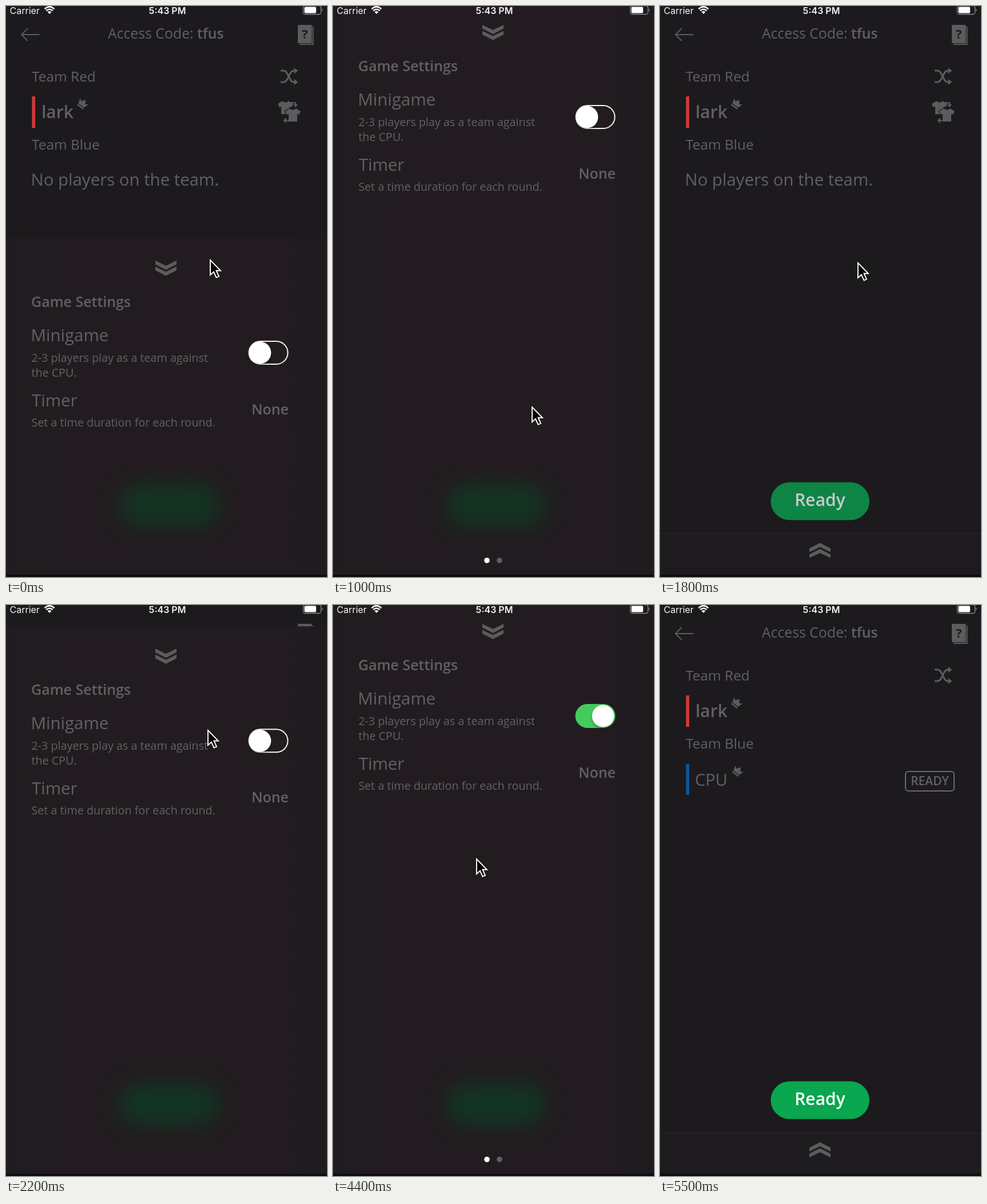
Write an HTML page that moves like this. It is 561 px wide and 998 px high and loops after 5600 ms.

```html
<!DOCTYPE html>
<html lang="en">
<head>
<meta charset="utf-8">
<title>Game lobby</title>
<style>
html, body { margin: 0; width: 100%; height: 100%; overflow: hidden; background: #1c1a1d; }
svg { display: block; width: 100vw; height: 100vh; }
text { font-family: 'Open Sans', 'Noto Sans', sans-serif; fill: #626063; white-space: pre; }
.bar text { font-family: Inter, Roboto, sans-serif; font-size: 16px; fill: #f4f4f4; }
.semi { font-weight: 600; }
.label { font-size: 24.4px; }
.big { font-size: 29.4px; }
.note { font-size: 19.7px; }
.head { font-size: 25px; font-weight: 600; }
.line { fill: none; stroke: #5c5b5d; }
.icon { fill: #5c5b5d; }
</style>
</head>
<body>
<svg viewBox="0 0 561 998" preserveAspectRatio="none">
  <defs>
    <linearGradient id="sheet">
      <stop offset="0" stop-color="#1f1b1f"/>
      <stop offset=".05" stop-color="#211c1f"/>
      <stop offset=".15" stop-color="#221c20"/>
      <stop offset=".87" stop-color="#221c20"/>
      <stop offset=".92" stop-color="#201b1f"/>
      <stop offset="1" stop-color="#1f1b1f"/>
    </linearGradient>
    <filter id="soft" x="-50%" y="-100%" width="200%" height="300%" color-interpolation-filters="sRGB">
      <feGaussianBlur stdDeviation="16"/>
    </filter>
    <filter id="shade" x="-40%" y="-40%" width="180%" height="180%">
      <feDropShadow dx="0" dy="3" stdDeviation="2.5" flood-opacity=".3"/>
    </filter>
    <clipPath id="cover"><rect id="coverBox" width="561" height="1100"/></clipPath>
    <path id="crown" d="M-9,-5 L-4.500,-1.500 L0,-8 L4.500,-1.500 L9,-5 L6.500,4 H-6.500 Z M-6.500,5.500 H6.500 V8 H-6.500 Z"/>
    <path id="shirt" d="M8,0 Q13.500,5 19,0 L27,5 L24,11 L21,9.500 V23 H6 V9.500 L3,11 L0,5 Z"/>
    <path id="chevron" d="M-18.500,-12.500 L0,-3.500 L18.500,-12.500 V-6 L0,3.500 L-18.500,-6 Z M-18.500,-2 L0,7 L18.500,-2 V4.500 L0,14 L-18.500,4.500 Z"/>
  </defs>

  <rect width="561" height="998" fill="#1c1a1d"/>

  <g id="lobby">
    <path class="line" stroke-width="1.8" d="M58.500,50 H27 M38,39 L27,50 L38,61"/>
    <text x="178" y="57" font-size="24.8">Access Code: <tspan class="semi">tfus</tspan></text>
    <path class="icon" d="M513,66 H535.500 V36 H537.500 V68 H513 Z M510,33 H534.500 V65 H510 Z"/>
    <text x="522.300" y="57" font-size="22" font-weight="700" text-anchor="middle" style="fill:#1c1a1d">?</text>

    <text class="label" x="45" y="132">Team Red</text>
    <path class="line" stroke-width="3" d="M480,113 H485 C494,113 494,133 503,133 H505 M480,133 H485 C494,133 494,113 503,113 H505"/>
    <path class="icon" d="M503.500,108 L510.500,113 L503.500,118.500 Z M503.500,127.500 L510.500,133 L503.500,138 Z"/>
    <rect x="45.500" y="158" width="5.500" height="55" fill="#d33a3b"/>
    <text class="semi" x="62" y="196" font-size="30">lark</text>
    <use href="#crown" class="icon" transform="translate(134 170.500) rotate(38)"/>

    <text class="label" x="45" y="251">Team Blue</text>
    <g id="empty">
      <g class="icon">
        <use href="#shirt" x="475" y="166"/>
        <use href="#shirt" x="488" y="179" stroke="#1c1a1d" stroke-width="2.500" paint-order="stroke"/>
      </g>
      <path class="line" stroke-width="2" d="M502,196 V200 H486 M490,196 L486,200 L490,204 M498,169 H506 V175 M503,172 L506,175.500 L509,172"/>
      <text class="big" x="43.500" y="314">No players on the team.</text>
    </g>
    <g id="rival">
      <rect x="45.500" y="278" width="5.500" height="54" fill="#0b57a0"/>
      <text x="61" y="316" font-size="29">CPU</text>
      <use href="#crown" class="icon" transform="translate(136 290) rotate(38)"/>
      <rect class="line" x="429" y="291" width="85" height="34" rx="5" stroke-width="2" style="stroke:#6a696b"/>
      <text class="semi" x="471.500" y="315" font-size="21" text-anchor="middle">READY</text>
    </g>

    <g id="ready">
      <rect x="193.500" y="832.500" width="172.500" height="66" rx="33" fill="#0aa650"/>
      <text class="semi" x="279.500" y="874" font-size="30" text-anchor="middle" style="fill:#fff">Ready</text>
    </g>
  </g>

  <g clip-path="url(#cover)">
    <rect width="561" height="998" fill="url(#sheet)"/>
    <g id="glow" filter="url(#soft)">
      <rect x="198" y="836" width="174" height="74" rx="37" fill="#133422"/>
    </g>
    <rect id="closedTint" width="561" height="998" fill="#1f1c1f"/>
  </g>
  <path id="edge" d="M0,0 H561" stroke="#29272a" stroke-width="1.500"/>
  <use id="grip" href="#chevron" class="icon"/>

  <g id="panel">
    <text class="head" x="44" y="114">Game Settings</text>
    <text class="big" x="43.500" y="174">Minigame</text>
    <text class="note" x="44.500" y="210">2-3 players play as a team against</text>
    <text class="note" x="44.500" y="236">the CPU.</text>
    <text class="big" x="45" y="288">Timer</text>
    <text class="note" x="44.500" y="323">Set a time duration for each round.</text>
    <text class="head" x="494" y="302" text-anchor="end">None</text>
    <rect id="track" x="424.500" y="174" width="68" height="40" rx="20" stroke-width="2"/>
    <circle id="knob" cy="194" r="19.300" fill="#fff" filter="url(#shade)"/>
    <circle cx="269" cy="969" r="4.800" fill="#fff"/>
    <circle cx="291" cy="969" r="4.800" fill="#625f62"/>
  </g>

  <g class="bar">
    <text x="6.500" y="14">Carrier</text>
    <path d="M67.500,5.200 Q76,-2.500 84.500,5.200 M70.300,8.300 Q76,3.200 81.700,8.300" fill="none" stroke="#f4f4f4" stroke-width="2.600"/>
    <path d="M72.500,10.300 Q76,7.500 79.500,10.300 L76,14 Z" fill="#f4f4f4"/>
    <text class="semi" x="282" y="14" text-anchor="middle">5:43 PM</text>
    <rect x="519.500" y="-.5" width="31" height="15" rx="3.500" fill="none" stroke="#8b898c" stroke-width="1.300"/>
    <rect x="521.500" y="1.500" width="20.500" height="11" rx="2" fill="#fff"/>
    <path d="M552,4.500 Q555,7 552,9.500 Z" fill="#8b898c"/>
  </g>
  <rect y="994" width="561" height="4" fill="#0d0c0e"/>
  <path id="cursor" d="M1,1 V27 L7,21.500 L11.500,31.500 L16,29.500 L11.500,19.500 H19 Z" fill="#000" stroke="#fff" stroke-width="1.900"/>
</svg>
<script>
const LOOP = 5600, STEP = 100, CLOSED = 928, TOGGLE = 3800;
const $ = id => document.getElementById(id);
const set = (id, name, value) => $(id).setAttribute(name, value);
const clamp = x => Math.max(0, Math.min(1, x));
const mix = (a, b, p) => a + (b - a) * p;

// time, x, y of the pointer tip
const path = [
  [0, 356, 443], [100, 351, 400], [200, 347, 382], [600, 347, 382],
  [700, 347, 576], [800, 347, 576], [1000, 347, 700], [1100, 348, 830],
  [1400, 346, 900], [1600, 345, 820], [1800, 345, 448], [1900, 348, 300],
  [2000, 350, 218], [2200, 352, 218], [2600, 383, 203], [3100, 383, 203],
  [3200, 409, 181], [3400, 442, 183], [3600, 456, 190], [3800, 456, 190],
  [4000, 330, 350], [4200, 254, 442], [4400, 250, 443], [4500, 235, 620],
  [4700, 190, 820], [4900, 140, 900], [5100, 75, 1005], [LOOP, 75, 1005]
];

function pointer(t) {
  const i = path.findIndex(k => k[0] > t);
  const a = path[i - 1], b = path[i], p = (t - a[0]) / (b[0] - a[0]);
  return [mix(a[1], b[1], p), mix(a[2], b[2], p)];
}

const opening = (from, dt) => from * Math.exp(-dt / 91);
const closing = dt => CLOSED * (1 - Math.exp(-dt / 110));

function panelOffset(t) {
  if (t < 1000) return opening(412, t);
  if (t < 1900) return closing(t - 1000);
  if (t < 2000) return 830;
  if (t < 4400) return opening(390, t - 2000);
  return closing(t - 4400);
}

function render(t) {
  const off = panelOffset(t), top = off - 6;
  const shut = clamp((off / CLOSED - .7) / .3);
  const on = clamp((t - TOGGLE + STEP) / 250) * (t >= TOGGLE);
  const fadeStart = t < 4400 ? 1480 : 4980;
  const fade = t < 1000 ? 1 : clamp((t - fadeStart) / 500);
  const [x, y] = pointer(t);

  set('coverBox', 'y', top);
  set('panel', 'transform', `translate(0 ${off})`);
  set('grip', 'transform', `translate(279.5 ${off + mix(45.5, 25, shut)}) scale(1 ${mix(1, -1, shut)})`);
  set('edge', 'transform', `translate(0 ${top + .5})`);
  set('edge', 'opacity', shut);
  set('closedTint', 'opacity', shut);
  set('glow', 'opacity', clamp((900 - top) / 300));
  set('ready', 'opacity', mix(.35, 1, fade));

  set('empty', 'visibility', t < TOGGLE ? 'visible' : 'hidden');
  set('rival', 'visibility', t < TOGGLE ? 'hidden' : 'visible');
  set('knob', 'cx', mix(444, 472, on));
  set('track', 'fill', `rgba(67,204,91,${on})`);
  set('track', 'stroke', on ? '#43cc5b' : '#f2f2f2');
  set('cursor', 'transform', `translate(${x} ${y})`);
}

// The screen is refreshed ten times a second.
const start = performance.now();
function tick() {
  const t = (performance.now() - start) % LOOP;
  render(Math.floor(t / STEP) * STEP);
  requestAnimationFrame(tick);
}
tick();
</script>
</body>
</html>
```
